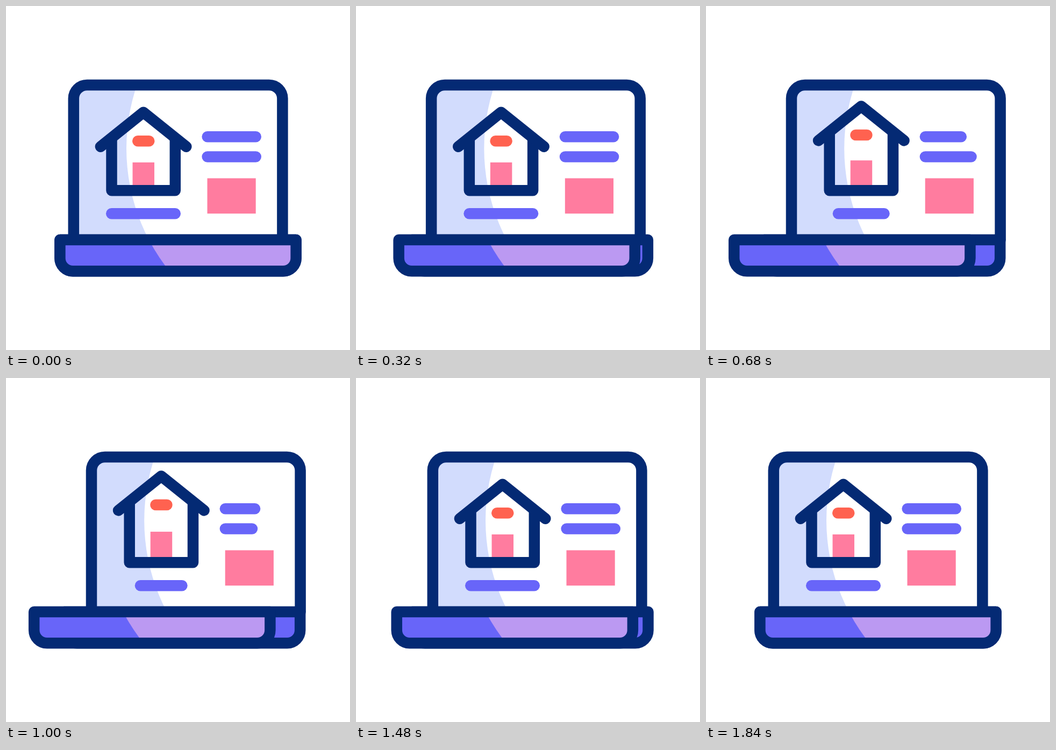
Recreate the animation shown at these times as an HTML page with a canvas. Size 640 by 640 pixels, loop 1.96 s.

```html
<!DOCTYPE html>
<html lang="en">
<head>
<meta charset="utf-8">
<title>Laptop listing</title>
<style>
html, body { margin: 0; width: 100%; height: 100%; overflow: hidden; background: #fff; }
canvas { display: block; width: 100vw; height: 100vh; }
</style>
</head>
<body>
<canvas id="stage" width="640" height="640"></canvas>
<script>
const ctx = document.getElementById('stage').getContext('2d');
const LOOP = 1960, STEP = 40, LINE = 20.5;
const NAVY = '#042a74', BLUE = '#6865f9', LILAC = '#bb99f2',
      PALE = '#d2dcfd', PINK = '#ff7c9f', RED = '#ff6250';

// Cubic bezier (.5, 0, .5, 1), solved by bisection
function ease(x) {
  if (x <= 0) return 0;
  if (x >= 1) return 1;
  let lo = 0, hi = 1;
  for (let i = 0; i < 24; i++) {
    const s = (lo + hi) / 2;
    if (1.5 * s * (1 - s) + s * s * s < x) lo = s; else hi = s;
  }
  return lo * lo * (3 - 2 * lo);
}

// Rises to 1 at the peak time and falls back, each over dur
const pulse = (t, peak, dur) => ease(1 - Math.abs(t - peak) / dur);
const slide = t => ease((t - 22) / 640) - ease((t - 1164) / 640);

function rect(color, x, y, w, h) {
  ctx.fillStyle = color;
  ctx.fillRect(x, y, w, h);
}

function stroke(color, ...pts) {
  ctx.beginPath();
  pts.forEach(([x, y]) => ctx.lineTo(x, y));
  ctx.strokeStyle = color;
  ctx.stroke();
}

function pill(color, left, right, y) {
  const r = LINE / 2;
  stroke(color, [left + r, y], [right - r, y]);
}

// Everything left of (or inside) the big circle shading the laptop
function circle(color) {
  ctx.beginPath();
  ctx.arc(590, 265, 366, 0, Math.PI * 2);
  ctx.fillStyle = color;
  ctx.fill();
}

function shifted(dx, draw) {
  ctx.save();
  ctx.translate(dx, 0);
  draw();
  ctx.restore();
}

function house(lift) {
  const door = 291 - lift * 0.33;
  rect(PINK, 235.5, door, 40.5, 338 - door);
  pill(RED, 235, 276.5, 251.2 - lift);
  ctx.lineCap = 'butt';
  stroke(NAVY, [196.5, 250 - lift], [196.5, 343.2], [314.8, 343.2], [314.8, 250 - lift]);
  ctx.lineCap = 'round';
  stroke(NAVY, [175.8, 261.7 - lift], [255.6, 197.7 - lift], [335.4, 261.7 - lift]);
}

function screen(t) {
  ctx.beginPath();
  ctx.moveTo(125.8, 435);
  ctx.lineTo(125.8, 172);
  ctx.arcTo(125.8, 147, 151, 147, 25);
  ctx.lineTo(489, 147);
  ctx.arcTo(514.4, 147, 514.4, 172, 25);
  ctx.lineTo(514.4, 435);
  const frame = new Path2D('M125.8 435V172a25 25 0 0 1 25-25H489.4a25 25 0 0 1 25 25V435');
  ctx.save();
  ctx.clip();
  rect(PALE, 120, 140, 400, 300);
  circle('#fff');
  ctx.restore();
  ctx.strokeStyle = NAVY;
  ctx.stroke(frame);

  pill(BLUE, 364.4, 475 - 40 * pulse(t, 881, 437), 243.2);
  pill(BLUE, 364.4, 475 - 40 * pulse(t, 1000, 430), 280.5);
  const cut = 43.5 * pulse(t, 890, 585) / 2;
  pill(BLUE, 186 + cut, 325 - cut, 386.2);
  rect(PINK, 374.5, 320.5, 90.2, 65.7);
  house(16.5 * pulse(t, 890, 520));
}

const tray = new Path2D('M100.4 435H539.6V469.2a24 24 0 0 1-24 24H124.4a24 24 0 0 1-24-24Z');

function base(shaded) {
  ctx.save();
  ctx.clip(tray);
  rect(BLUE, 90, 425, 460, 80);
  if (shaded) circle(LILAC);
  ctx.restore();
  ctx.strokeStyle = NAVY;
  ctx.stroke(tray);
}

function draw(t) {
  rect('#fff', 0, 0, 640, 640);
  ctx.lineWidth = LINE;
  ctx.lineCap = ctx.lineJoin = 'round';
  const k = slide(t);
  shifted(33.2 * k, () => screen(t));
  shifted(7.6 * k, () => base(false));
  shifted(-48.2 * k, () => base(true));
}

const start = performance.now();
function tick() {
  const t = (performance.now() - start) % LOOP;
  draw(Math.floor(t / STEP) * STEP);
  requestAnimationFrame(tick);
}
tick();
</script>
</body>
</html>
```
